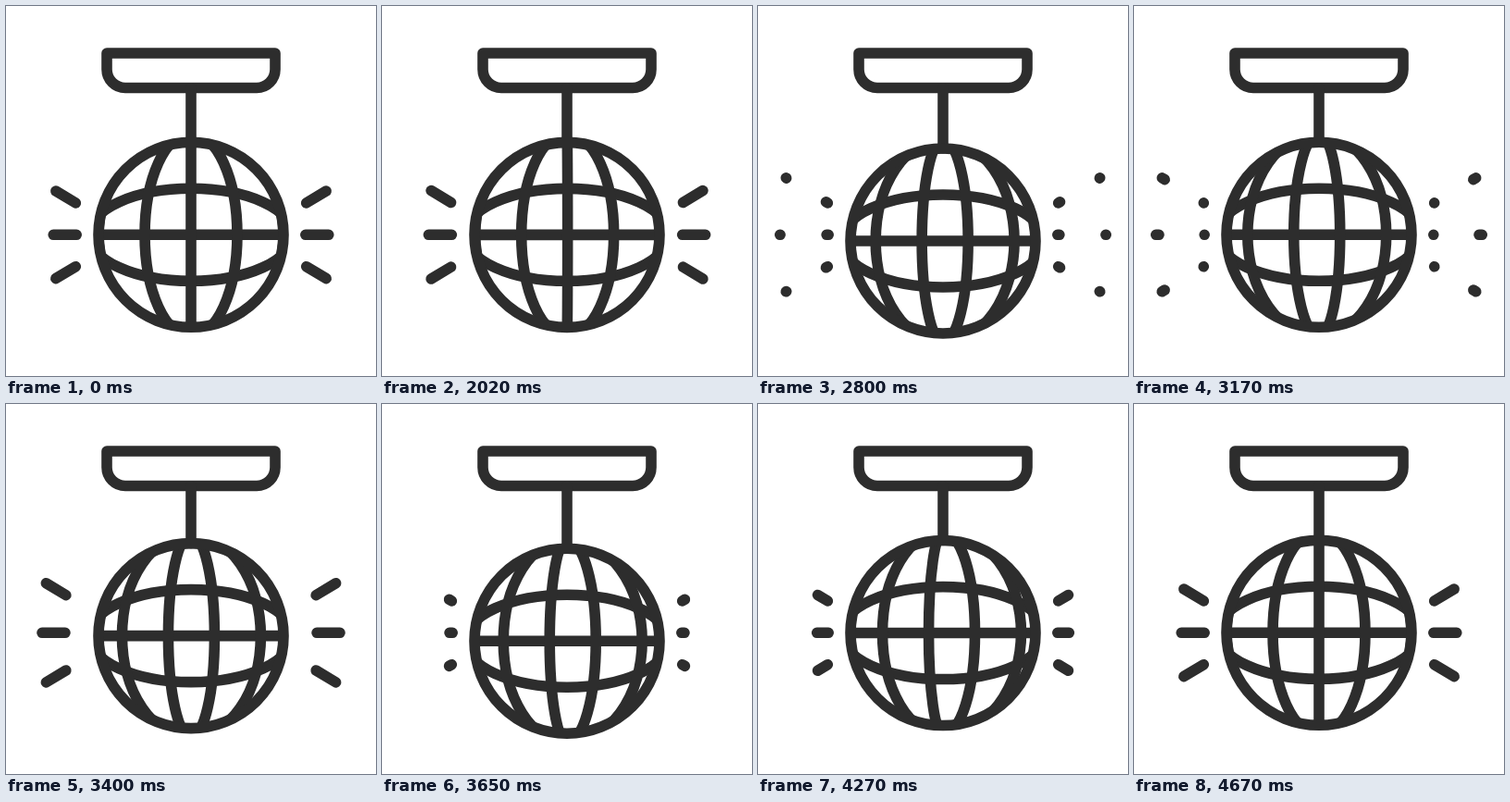
An HTML page for the animation above (4.7 s loop, 400 by 400 pixels).

```html
<!DOCTYPE html>
<html lang="en">
<head>
<meta charset="utf-8">
<title>Disco ball</title>
<style>
  html, body { margin: 0; width: 100%; height: 100%; overflow: hidden; background: #fff; }
  svg { display: block; width: 100vw; height: 100vh; }
  .ink { fill: none; stroke: #2d2d2d; stroke-width: 11.6; stroke-linecap: round; stroke-linejoin: round; }
</style>
</head>
<body>
<svg viewBox="0 0 400 400">
  <defs>
    <clipPath id="disc"><circle r="100"/></clipPath>
  </defs>
  <g class="ink">
    <path d="M109 51H291V68.5a20 20 0 0 1-20 20H129a20 20 0 0 1-20-20Z"/>
    <path id="rod"/>
    <path id="rays"/>
    <g id="ball">
      <g clip-path="url(#disc)">
        <path d="M-100 0H100M-110 0A110 50 0 0 1 110 0M-110 0A110 50 0 0 0 110 0"/>
        <path id="meridians"/>
      </g>
      <circle r="100"/>
    </g>
  </g>
</svg>
<script>
const LOOP = 4700, START = 2000, BOUNCE = 1167;
const CX = 200, CY = 247.3, DROP = 9.6;
const GAP = 50;                            // spacing of meridians at the equator
const TRACK = 52.5, DASH = 25, PERIOD = 75; // light rays

const get = id => document.getElementById(id);
const [rod, rays, ball, meridians] = ['rod', 'rays', 'ball', 'meridians'].map(get);

// Smooth curve through [time, value] points, starting at a given speed and ending at rest.
function spline(points, speed) {
  const last = points.length - 1;
  const slope = i => i === 0 ? speed : i === last ? 0 :
    (points[i + 1][1] - points[i - 1][1]) / (points[i + 1][0] - points[i - 1][0]);
  return t => {
    if (t <= 0) return points[0][1];
    if (t >= points[last][0]) return points[last][1];
    const i = points.findIndex(p => p[0] > t) - 1;
    const [t0, a] = points[i], [t1, b] = points[i + 1];
    const h = t1 - t0, u = (t - t0) / h, v = 1 - u;
    return a * v * v * (1 + 2 * u) + b * u * u * (3 - 2 * u)
      + h * u * v * (slope(i) * v - slope(i + 1) * u);
  };
}

const spin = spline([[0, 0], [800, 77], [1170, 172.5], [1650, 281], [1970, 355.5], [2670, 400]], 0.03);
const travel = spline([[0, 0], [800, 52], [1170, 124], [1650, 203], [1970, 264], [2670, 300]], 0.04);

const trackLines = [-1, 1].flatMap(side => [
  [75.3, -34.4, -0.857, -0.515],
  [76.2, 0, -1, 0],
  [75.3, 34.4, -0.857, 0.515]
].map(([x, y, dx, dy]) => [CX + side * (CX - x), CY + y, -side * dx, dy]));

function meridianPath(turn) {
  let d = '';
  for (let i = 0; i < 5; i++) {
    const x = turn % GAP + GAP * (i - 2);
    d += Math.abs(x) < 0.05 ? 'M0-110V110'
      : `M0-110A${Math.abs(x)} 110 0 0 ${x > 0 ? 1 : 0} 0 110`;
  }
  return d;
}

function rayPath(shift) {
  let d = '';
  for (let k = 0; k < 5; k++) {
    const tail = shift - PERIOD * k, head = tail + DASH;
    if (head < -1.5 || tail > TRACK) continue;
    const a = Math.max(tail, 0), b = Math.max(Math.min(head, TRACK), a + 0.01);
    for (const [x, y, dx, dy] of trackLines)
      d += `M${x + dx * a} ${y + dy * a}L${x + dx * b} ${y + dy * b}`;
  }
  return d;
}

function draw(now) {
  const t = Math.max(0, now % LOOP - START);
  const drop = t < 2 * BOUNCE ? DROP * (1 - Math.cos(2 * Math.PI * t / BOUNCE)) / 2 : 0;
  const y = CY + drop;
  ball.setAttribute('transform', `translate(${CX} ${y})`);
  rod.setAttribute('d', `M${CX} 89V${y - 100}`);
  meridians.setAttribute('d', meridianPath(spin(t)));
  rays.setAttribute('d', rayPath(travel(t)));
}

function tick() {
  draw(performance.now());
  requestAnimationFrame(tick);
}
tick();
</script>
</body>
</html>
```
